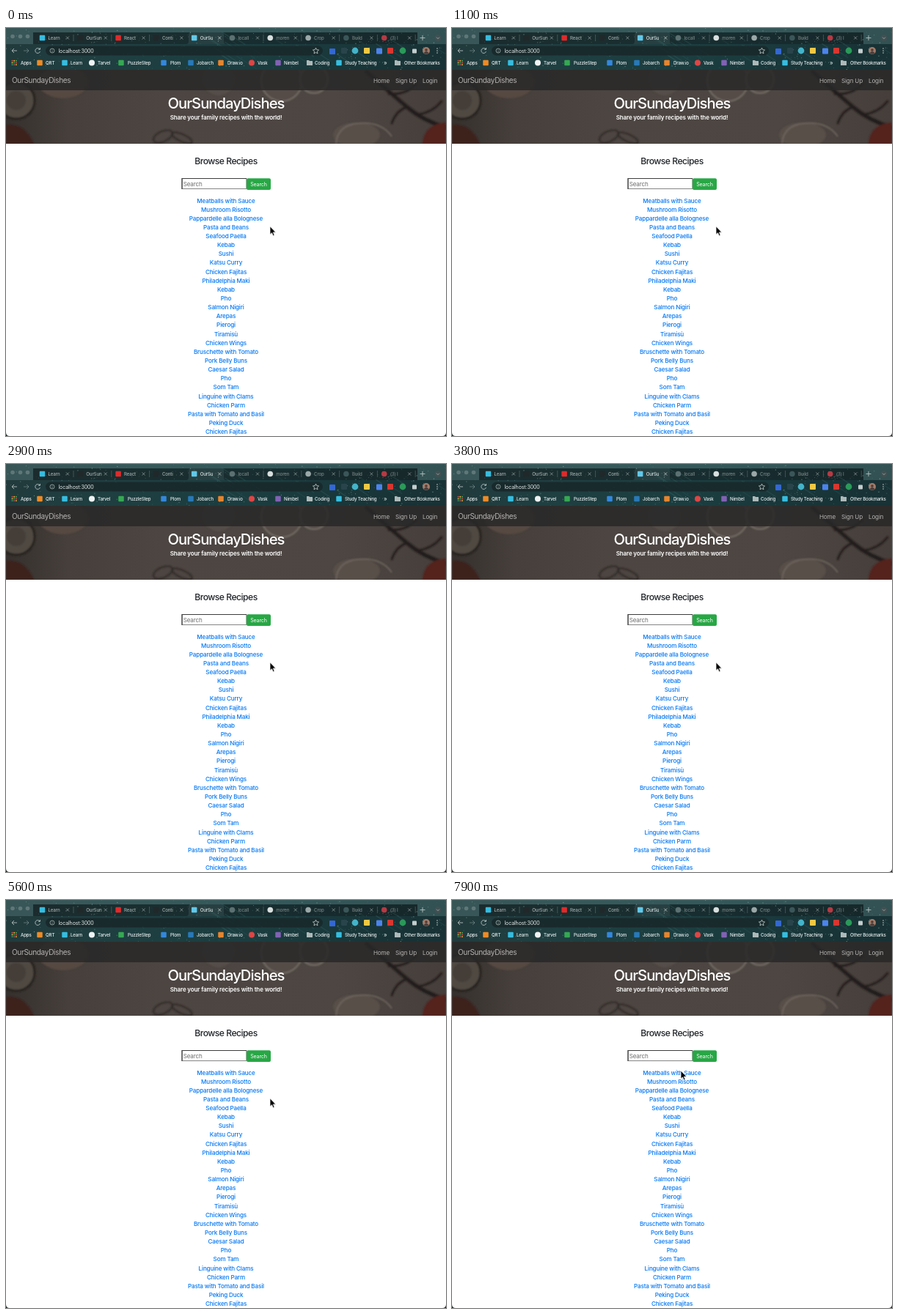
Write an HTML page that moves like this. It is 600x557 px and loops after 8000 ms.

```html
<!DOCTYPE html>
<html lang="en">
<head>
<meta charset="utf-8">
<title>Browse Recipes</title>
<style>
  html, body { margin: 0; width: 100%; height: 100%; overflow: hidden; background: #fff; }
  svg { display: block; width: 600px; height: 557px; }
  text { font-family: Inter, "Open Sans", sans-serif; font-size: 8.1px; letter-spacing: -.02em; }
  .mid { text-anchor: middle; }
  .small { font-size: 6.2px; fill: #e9eeee; font-weight: 500; letter-spacing: -.03em; }
  .nav { fill: #b4b2b0; }
  .link { fill: #0277f4; font-weight: 450; }
  .line { fill: none; stroke: #b4c0c0; stroke-width: .9; }
  .pointer { animation: glide 8s infinite; }
  @keyframes glide {
    0%, 92.5% { transform: translate(360px, 270.7px); animation-timing-function: ease-in-out; }
    98.75%, 100% { transform: translate(312px, 233px); }
  }
</style>
</head>
<body>
<svg viewBox="0 0 600 557">
  <defs>
    <linearGradient id="sky" x2="1" y2=".1">
      <stop offset="0" stop-color="#22393b"/>
      <stop offset=".3" stop-color="#1f3f41"/>
      <stop offset=".65" stop-color="#1b3d40"/>
      <stop offset="1" stop-color="#183235"/>
    </linearGradient>
    <linearGradient id="table" x2="1">
      <stop offset="0" stop-color="#35302d"/>
      <stop offset=".14" stop-color="#463f3b"/>
      <stop offset=".35" stop-color="#4c4541"/>
      <stop offset=".75" stop-color="#4d4642"/>
      <stop offset="1" stop-color="#453e3a"/>
    </linearGradient>
    <filter id="soft"><feGaussianBlur stdDeviation=".9"/></filter>
    <clipPath id="heroClip"><rect y="57" width="600" height="101"/></clipPath>
    <clipPath id="chromeClip"><rect width="600" height="57"/></clipPath>
  </defs>

  <rect width="600" height="557" fill="#fff"/>

  <g clip-path="url(#chromeClip)">
    <rect width="600" height="57" fill="url(#sky)"/>
    <path d="M0 0H600V22H561V6H37V22H0Z" fill="#5b7f80" opacity=".4"/>
    <rect x="37" y="6" width="524" height="16" fill="#14191c" opacity=".45"/>
    <path d="M246 22q3 0 3-4V9q0-3 3-3h42q3 0 3 3v9q0 4 3 4z" fill="#283f41"/>
    <g id="stars"></g>
    <rect x="54" y="24.5" width="378" height="13" rx="6.5" fill="#19282b" opacity=".9"/>
    <g id="tabs"></g>
    <g id="tools"></g>
    <g id="marks"></g>
  </g>

  <g clip-path="url(#heroClip)">
    <rect y="57" width="600" height="101" fill="url(#table)"/>
    <g filter="url(#soft)">
      <ellipse cx="78" cy="74" rx="34" ry="22" fill="#574942"/>
      <circle cx="14" cy="99" r="25" fill="#4f4843" stroke="#27221f" stroke-width="3"/>
      <circle cx="14" cy="99" r="13" fill="#453d38"/>
      <path d="M0 132q26-2 38 26H0z" fill="#3d211e"/>
      <g fill="none" stroke="#2b2623" stroke-width="1.6">
        <ellipse cx="214" cy="148" rx="14" ry="7" transform="rotate(-24 214 148)"/>
        <ellipse cx="240" cy="150" rx="15" ry="5" transform="rotate(24 240 150)"/>
      </g>
      <circle cx="290" cy="70" r="22" fill="#554d48"/>
      <g fill="#544c46" stroke="#756d66" stroke-width="2">
        <circle cx="376" cy="72" r="28"/>
        <circle cx="420" cy="70" r="19"/>
      </g>
      <ellipse cx="478" cy="146" rx="32" ry="17" fill="#584f49"/>
      <path d="M450 158q2-26 32-28t44 18" fill="none" stroke="#6d645d" stroke-width="2"/>
      <g fill="none" stroke="#241f1c" stroke-linecap="round">
        <path d="M492 60q34 30 55 48t53 28" stroke-width="5"/>
        <path d="M522 90q22 2 38-14M546 108q-14 5-20 22M562 118q20-3 32-18" stroke-width="2.6"/>
      </g>
      <path d="M568 158q2-27 32-29v29z" fill="#54231f"/>
    </g>
    <rect y="57" width="600" height="28" fill="#292929" opacity=".85"/>
  </g>

  <text x="8" y="75" class="nav" style="font-size:10.1px;letter-spacing:-.035em">OurSundayDishes</text>
  <text x="501" y="74.6" class="nav">Home</text>
  <text x="531" y="74.6" class="nav">Sign Up</text>
  <text x="568" y="74.6" class="nav">Login</text>
  <text x="300" y="109.6" class="mid" fill="#fff" font-weight="500" style="font-size:20.25px;letter-spacing:-.05em">OurSundayDishes</text>
  <text x="300" y="125.4" class="mid" fill="#fff" font-weight="600" style="letter-spacing:-.021em">Share your family recipes with the world!</text>

  <text x="300" y="186.2" class="mid" fill="#212529" font-weight="500" style="font-size:12.15px;letter-spacing:-.042em">Browse Recipes</text>
  <rect x="240.2" y="205.5" width="87.6" height="14" fill="#fff" stroke="#858585"/>
  <path d="M240 220V205.5H328" fill="none" stroke="#3c3c3c" stroke-width="1.2"/>
  <text x="241.7" y="215.6" fill="#6c6c6c">Search</text>
  <rect x="328" y="205.3" width="33" height="15.7" rx="2" fill="#28a745"/>
  <text x="344.5" y="215.7" class="mid" fill="#fff" style="font-size:7.1px">Search</text>
  <g id="recipes"></g>

  <path d="M0 552v5h5q-5 0-5-5M600 552v5h-5q5 0 5-5" fill="#20282a"/>
  <path class="pointer" d="M0 0V11.2L2.5 8.9 4.3 13 6.2 12.2 4.4 8.2H7.9Z" fill="#000" stroke="#fff" stroke-width=".8"/>
</svg>

<script>
  const SVG = 'http://www.w3.org/2000/svg';
  const byId = id => document.getElementById(id);

  function add(parent, tag, attrs, label) {
    const el = document.createElementNS(SVG, tag);
    for (const key in attrs) el.setAttribute(key, attrs[key]);
    if (label) el.textContent = label;
    return parent.appendChild(el);
  }
  const dot = (g, cx, cy, r, fill, opacity = 1) => add(g, 'circle', { cx, cy, r, fill, opacity });
  const box = (g, cx, cy, size, fill) =>
    add(g, 'rect', { x: cx - size / 2, y: cy - size / 2, width: size, height: size, rx: 1, fill });
  const stroke = (g, d, opacity = 1) => add(g, 'path', { d, class: 'line', opacity });

  // Starry browser theme
  let seed = 17;
  const rand = () => (seed = seed * 16807 % 2147483647) / 2147483647;
  const stars = byId('stars');
  for (let i = 0; i < 28; i++) {
    const x = 270 + rand() * 330, y = rand() * 40, len = 8 + rand() * 22;
    add(stars, 'path', { d: `M${x} ${y}l${len} ${len * .65}`, stroke: '#3f7777', 'stroke-width': 1.4, opacity: .12 + rand() * .2 });
  }
  for (let i = 0; i < 420; i++)
    dot(stars, rand() * 600, rand() * 57, .25 + rand() * .45, '#a9d2cd', .12 + rand() * .45);

  // Tab strip
  const tabs = byId('tabs');
  [9, 19.5, 29.5].forEach(x => dot(tabs, x, 11.5, 2.8, '#5f7779'));
  const tabList = [
    ['Learn', '#35bcdf'], ['OurSun', '#20282a'], ['React', '#e02a2a'], ['Conti', '#20282a'],
    ['OurSu', '#61c8e8'], ['locall', '#5c7072'], ['moren', '#d8dfdf'], ['Crop', '#9ba7a8'],
    ['Build', '#3b5658'], ['(3) I', '#b53a43']
  ];
  tabList.forEach(([label, color], i) => {
    const x = 41 + i * 51.8, active = i === 4;
    if (i > 4) dot(tabs, x + 8.5, 13.5, 3.8, color);
    else box(tabs, x + 8.5, 13.5, 7.5, color);
    add(tabs, 'text', { x: x + 16.5, y: 15.7, class: 'small', opacity: active ? .9 : i > 4 ? .45 : .65 }, label);
    stroke(tabs, `M${x + 41} 11.5l4 4m0-4l-4 4`, active ? 1 : .65);
    if (i !== 3 && !active) stroke(tabs, `M${x + 51} 9v9`, .3);
  });
  stroke(tabs, 'M564.5 13.5h7M568 10v7');
  dot(tabs, 589, 13.5, 4.5, '#415052');
  stroke(tabs, 'M587 12.7l2 2 2-2', .8);

  // Address bar
  const tools = byId('tools');
  stroke(tools, 'M15 31H8m3-3l-3 3 3 3');
  stroke(tools, 'M24 31h7m-3-3l3 3-3 3', .45);
  stroke(tools, 'M46 29a3.4 3.4 0 1 0 .5 3M46.5 27v2.3h-2.3');
  stroke(tools, 'M66 31a3 3 0 1 0-6 0a3 3 0 1 0 6 0M63 30.7v2M63 29v.6', .8);
  add(tools, 'text', { x: 71.5, y: 33.7, fill: '#e2e9e9', style: 'font-size:7.1px' }, 'localhost:3000');
  stroke(tools, 'M422.5 27l1.2 2.7 2.9.3-2.2 2 .6 2.9-2.5-1.5-2.5 1.5.6-2.9-2.2-2 2.9-.3z');
  box(tools, 445, 32, 8, '#3267d6');
  box(tools, 461, 31, 8, '#29444b');
  dot(tools, 476, 31, 4.4, '#43b4c9');
  box(tools, 492, 31, 8, '#f1c842');
  box(tools, 509, 31.5, 8, '#4c83ed');
  box(tools, 524, 31, 8, '#d8362f');
  dot(tools, 541, 31, 4.4, '#299a58');
  box(tools, 557, 31.5, 6, '#c4cdcd');
  dot(tools, 573, 31, 5, '#a17b69');
  dot(tools, 573, 30, 1.8, '#493c38');
  add(tools, 'path', { d: 'M569.5 34q3.5-4 7 0-3.5 3.5-7 0', fill: '#493c38' });
  [28, 31, 34].forEach(y => dot(tools, 588, y, .8, '#c5cece'));

  // Bookmarks: icon centre, text start, label, icon colour, icon shape
  const marks = byId('marks');
  const folder = (g, x, y, size, color) =>
    add(g, 'path', { d: `M${x - 4} ${y - 3.5}h3l1 1h4v6h-8z`, fill: color });
  const hues = ['#df5146', '#efbc37', '#47a463'];
  for (let i = 0; i < 9; i++) {
    const col = i % 3, row = Math.floor(i / 3);
    box(marks, 8.5 + col * 2.7, 44.7 + row * 2.7, 1.9, hues[(col + row) % 3]);
  }
  add(marks, 'text', { x: 20, y: 49.7, class: 'small' }, 'Apps');
  [
    [46, 54, 'QRT', '#ed8b25', box], [80, 88, 'Learn', '#36bddf', box],
    [117, 125, 'Tarvel', '#f0f3f3', dot], [157, 166, 'PuzzleStep', '#35a852', box],
    [215, 224, 'Plom', '#3487dc', box], [252, 260, 'Jobarch', '#2879b8', box],
    [293, 302, 'Draw.io', '#e6852d', box], [335, 343, 'Vask', '#df4545', dot],
    [371, 379, 'Nimbel', '#8262b4', box], [414, 421, 'Coding', '#aeb9b9', folder],
    [454, 462, 'Study Teaching', '#36bddf', box], [534, 543, 'Other Bookmarks', '#aeb9b9', folder]
  ].forEach(([x, start, label, color, shape]) => {
    shape(marks, x, 47.5, shape === dot ? 4 : 7.5, color);
    add(marks, 'text', { x: start, y: 49.7, class: 'small' }, label);
  });
  add(marks, 'text', { x: 515, y: 50, fill: '#dbe3e3' }, '»');

  // Recipe list
  const recipes = [
    'Meatballs with Sauce', 'Mushroom Risotto', 'Pappardelle alla Bolognese', 'Pasta and Beans',
    'Seafood Paella', 'Kebab', 'Sushi', 'Katsu Curry', 'Chicken Fajitas', 'Philadelphia Maki',
    'Kebab', 'Pho', 'Salmon Nigiri', 'Arepas', 'Pierogi', 'Tiramisù', 'Chicken Wings',
    'Bruschette with Tomato', 'Pork Belly Buns', 'Caesar Salad', 'Pho', 'Som Tam',
    'Linguine with Clams', 'Chicken Parm', 'Pasta with Tomato and Basil', 'Peking Duck', 'Chicken Fajitas'
  ];
  recipes.forEach((name, i) =>
    add(byId('recipes'), 'text', { x: 300, y: 238.5 + i * 12.14, class: 'mid link' }, name));
</script>
</body>
</html>
```
